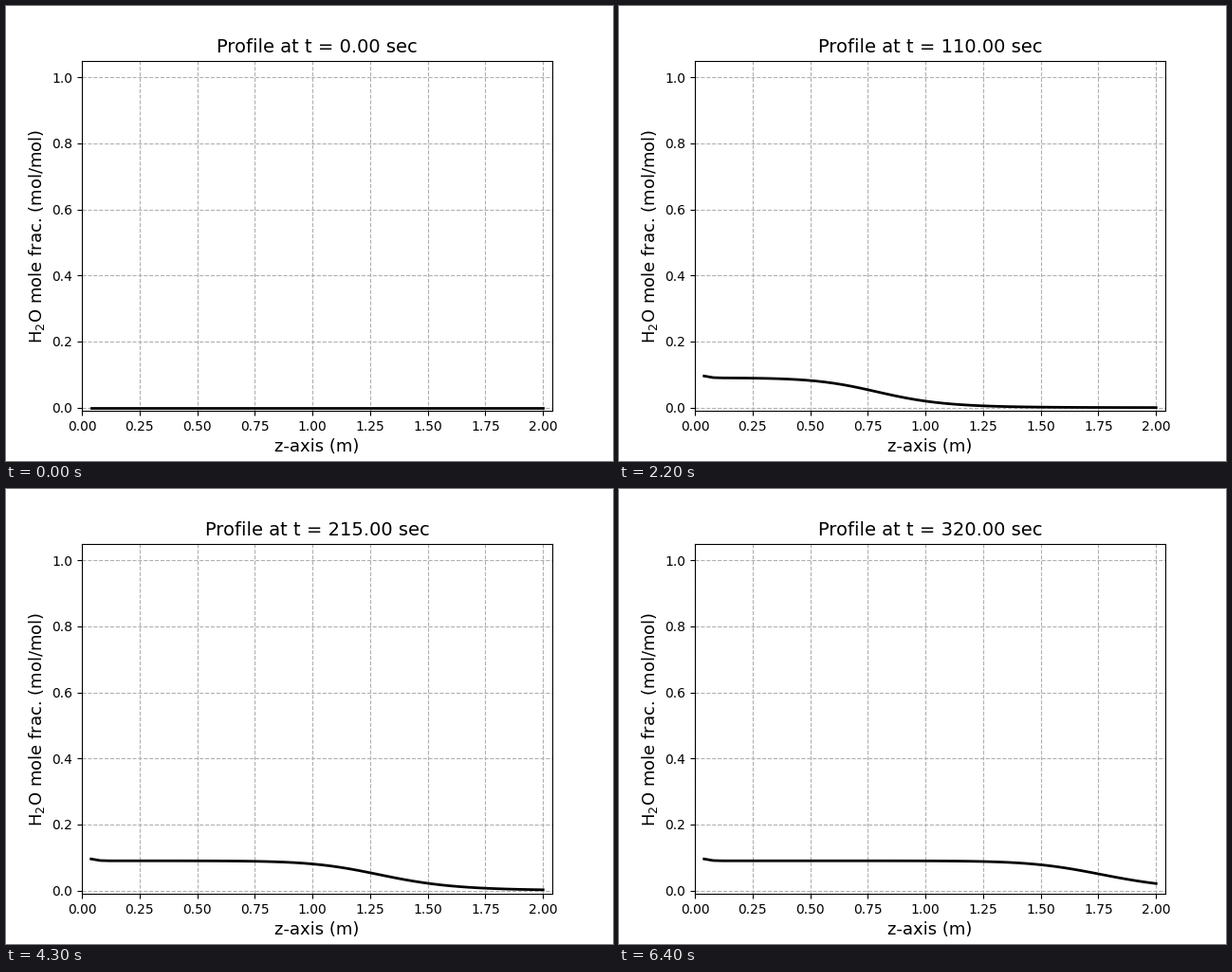
A matplotlib script that plays this animation: 640 px wide and 480 px high, repeating every 6500 ms.

```python
import numpy as np
import matplotlib.pyplot as plt
from matplotlib.animation import FuncAnimation

FRAMES = 65
INTERVAL = 100      # ms
STEP = 5.0          # simulated seconds per frame
PLATEAU = 0.0903    # mole fraction behind the front

plt.rcParams["font.family"] = "DejaVu Sans"

z = 0.04 * np.arange(1, 51)


def profile(t):
    """Mole fraction along the bed: a skewed logistic front that slows and widens."""
    if t == 0:
        return np.zeros_like(z)
    mid = 0.25 + 0.0052 * t - 1.2e-6 * t**2 - 0.13 * np.exp(-t / 12)
    slope = 14.1 * t**-0.15
    u = z - mid
    y = PLATEAU / (1 + np.exp(slope * u - 1.7 * u**2))
    # inlet mixing raises the first two cells
    y[0] += 0.0056
    y[1] += 0.0008
    return y


fig, ax = plt.subplots(figsize=(6.4, 4.8), dpi=100)
line, = ax.plot(z, profile(0), color="black", linewidth=2)
title = ax.set_title("", fontsize=14)
ax.set_xlim(0, 2.04)
ax.set_ylim(-0.01, 1.05)
ax.set_xlabel("z-axis (m)", fontsize=13)
ax.set_ylabel("H$_2$O mole frac. (mol/mol)", fontsize=13)
ax.grid(linestyle="--")


def update(i):
    t = i * STEP
    line.set_ydata(profile(t))
    title.set_text(f"Profile at t = {t:.2f} sec")
    return line, title


anim = FuncAnimation(fig, update, frames=FRAMES, interval=INTERVAL,
                     init_func=lambda: update(0), repeat=True, repeat_delay=0)
plt.show()
```
